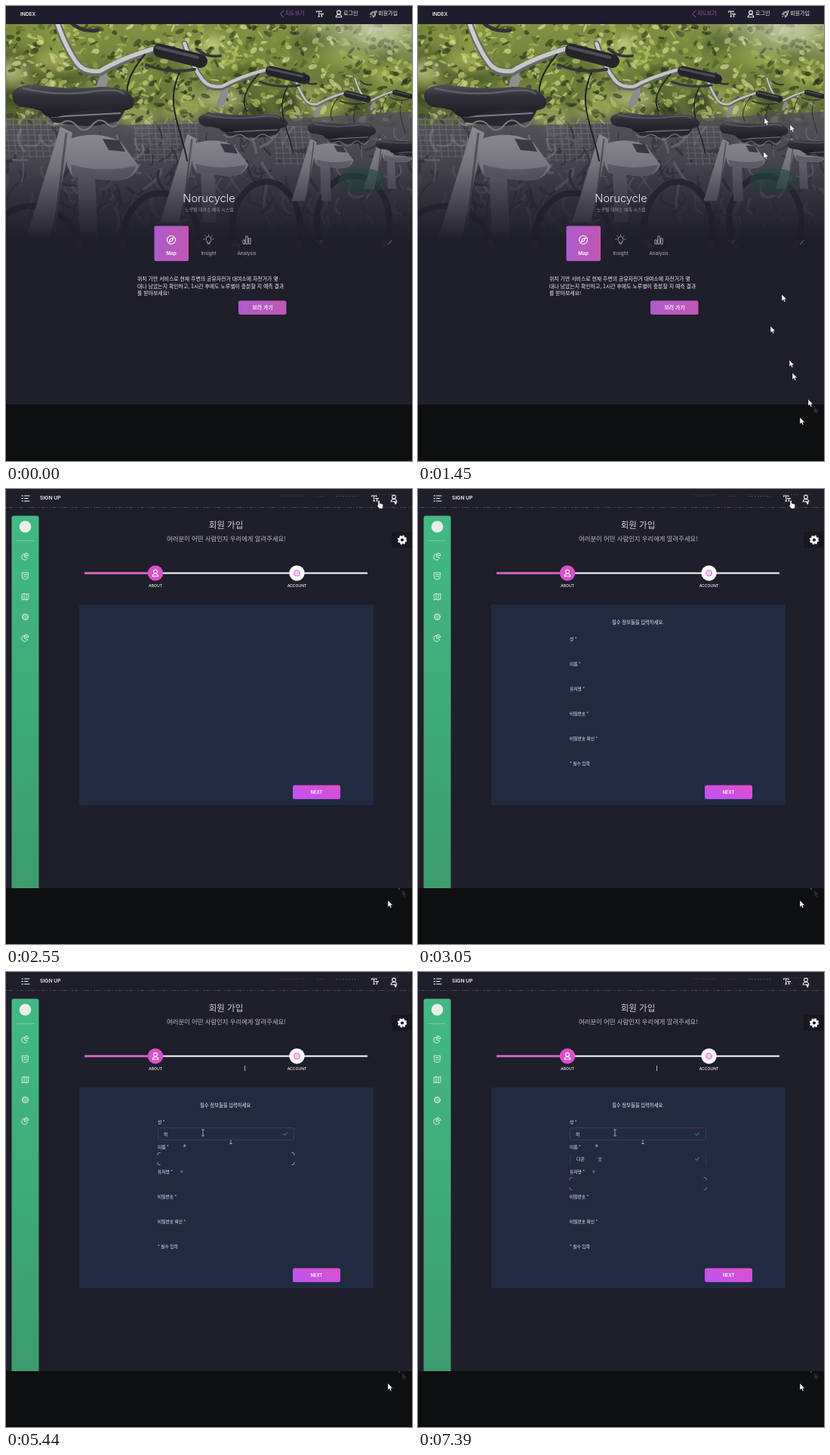
Write an HTML page that moves like this. It is 538 px wide and 603 px high and loops after 8000 ms.

```html
<!DOCTYPE html>
<html lang="ko">
<head>
<meta charset="utf-8">
<title>Bike share sign-up</title>
<style>
html, body { margin: 0; width: 100%; height: 100%; overflow: hidden; background: #0e0f11; }
svg { display: block; width: 538px; height: 603px; }
text { font-family: Inter, "Noto Sans CJK KR", "Noto Sans CJK", sans-serif; fill: #f1f0f5; }
.ko { font-family: "Noto Sans CJK KR", "Noto Sans CJK", sans-serif; }
.mid { text-anchor: middle; }
.b { font-weight: 700; }
.line { fill: none; stroke: #fff; stroke-linecap: round; stroke-linejoin: round; }
[data-t] { visibility: hidden; }
</style>
</head>
<body>
<svg viewBox="0 0 538 603">
<defs>
  <linearGradient id="photo" x2="0" y2="1">
    <stop stop-color="#839244"/><stop offset=".38" stop-color="#6d7b3c"/>
    <stop offset=".5" stop-color="#615f63"/><stop offset=".75" stop-color="#4a4853"/><stop offset="1" stop-color="#1f1e2b"/>
  </linearGradient>
  <linearGradient id="shade" x2="0" y2="1">
    <stop stop-color="#1f1e2b" stop-opacity="0"/><stop offset=".4" stop-color="#1f1e2b" stop-opacity=".1"/>
    <stop offset=".65" stop-color="#1f1e2b" stop-opacity=".34"/><stop offset=".85" stop-color="#1f1e2b" stop-opacity=".74"/>
    <stop offset="1" stop-color="#1f1e2b"/>
  </linearGradient>
  <radialGradient id="haze"><stop stop-color="#cbd2c2" stop-opacity=".75"/><stop offset="1" stop-color="#a5b08f" stop-opacity="0"/></radialGradient>
  <linearGradient id="leather" x2="0" y2="1"><stop stop-color="#57565d"/><stop offset=".35" stop-color="#33323a"/><stop offset="1" stop-color="#1d1c23"/></linearGradient>
  <linearGradient id="mauve"><stop stop-color="#ad5ccb"/><stop offset="1" stop-color="#c058b4"/></linearGradient>
  <linearGradient id="pink" y1="1" y2="0"><stop stop-color="#ba54f5"/><stop offset="1" stop-color="#e14eca"/></linearGradient>
  <linearGradient id="side" x2="0" y2="1"><stop stop-color="#42b983"/><stop offset="1" stop-color="#3d9c6c"/></linearGradient>
  <clipPath id="hero"><path d="M0 24H538V320H0z"/></clipPath>
  <filter id="soft"><feGaussianBlur stdDeviation="7"/></filter>
  <filter id="crisp"><feGaussianBlur stdDeviation=".6"/></filter>

  <g id="seat">
    <path d="M48 136L160 134 150 152Q120 162 92 158L62 154z" fill="#2b2a31"/>
    <path d="M54 153q10 9 20 2t20 4 20-1 20-2 18-6M60 147L152 142" fill="none" stroke="#8d8b92" stroke-width="2"/>
    <path d="M8 117Q12 104 38 104Q85 112 125 107Q164 107 170 126Q171 138 152 139Q105 134 76 145Q54 152 46 139Q36 135 20 134Q8 130 8 117z" fill="url(#leather)"/>
    <path d="M22 109Q70 120 110 114T156 117" fill="none" stroke="#77767c" stroke-width="2.500" opacity=".7"/>
  </g>
  <g id="body">
    <path d="M72 160L88 168 58 310H26z" fill="#a3a1a8"/>
    <path d="M80 168L64 300" fill="none" stroke="#66646d" stroke-width="3"/>
    <path d="M95 225L118 228 122 310H98z" fill="#817f88"/>
    <path d="M84 176Q122 164 152 180L176 212Q168 234 138 231L88 226Q74 205 84 176z" fill="#a5a3ab"/>
    <path d="M86 210Q125 222 172 212Q166 234 138 231L88 226z" fill="#7d7b85"/>
    <path d="M128 176L150 178 158 193 136 191z" fill="#44424d"/>
  </g>
  <g id="bar" fill="none" stroke-linecap="round">
    <path d="M130 96L122 116" stroke="#97979a" stroke-width="12"/>
    <path d="M64 10Q76 50 93 74Q103 91 125 88Q151 72 194 58" stroke="#6c6d6e" stroke-width="10"/>
    <path d="M64 10Q76 50 93 74Q103 89 125 86Q151 70 194 57" stroke="#d0d1cf" stroke-width="5.500"/>
    <path d="M84 20Q100 36 122 32" stroke="#34333a" stroke-width="5"/>
    <path d="M204 59L258 73" stroke="#26252b" stroke-width="18"/>
    <path d="M200 55L254 68" stroke="#504f55" stroke-width="4"/>
    <path d="M186 78Q215 90 250 84" stroke="#39383e" stroke-width="4"/>
    <path d="M230 88C210 130 232 160 240 205M184 64Q150 105 165 130" stroke="#242329" stroke-width="2"/>
  </g>
  <path id="arrow" d="M0 0V9L2.1 7.2 3.5 10.3 5 9.6 3.7 6.7H6.4z" fill="#fff" stroke="#1a1a22" stroke-width=".5"/>
  <path id="hand" d="M2 0Q3.2 0 3.2 1.2V4L7 5Q8 5.4 7.6 7L7 11H2.6L0 7.4Q-.3 6 1 6.5V1.2Q1 0 2 0z" fill="#fff" stroke="#1a1a22" stroke-width=".5"/>
  <path id="beam" d="M-2 -4H2M0 -4V4M-2 4H2" fill="none" stroke="#a9acb9" stroke-width=".9"/>
  <path id="corners" d="M0 3.5V2Q0 0 2 0H3.5M177.5 0H179Q181 0 181 2V3.5M181 12.5V14Q181 16 179 16H177.5M3.5 16H2Q0 16 0 14V12.5" fill="none" stroke-width=".9"/>
  <path id="tick" d="M0 2L1.8 4 5.2 0" fill="none" stroke-width=".9"/>
  <g id="user" fill="none" stroke-width="1.1"><circle cy="-2" r="2.4"/><path d="M-3.8 4.3Q-3.8 1 0 1T3.8 4.3z"/></g>
  <path id="type" d="M-4.5 -2V-3.5H2V-2M-1.3 -3.5V3.5M-2.8 3.5H.2M0 0H4.5V1M2.5 0V3.5M1.5 3.5H3.5" fill="none" stroke-width="1.1"/>
  <g id="rocket" fill="none" stroke-width=".85"><path d="M-2.8 .4Q0 -4 4.2 -4.2Q4 0 -.4 2.8z M-2.6 0L-4.6 .6 -2.4 -2.4 0 -2.4M0 2.6L-.6 4.6 2.4 2.4V0M-2.8 2.6L-4.4 4.4"/><circle cx="1.4" cy="-1.4" r=".8"/></g>
  <g id="pie" class="line" stroke-width=".9"><path d="M-1 -3A4 4 0 1 0 3 2L-1 1z"/><path d="M1 -4.4A4 4 0 0 1 4.4 -.6H1z"/></g>
  <g id="cog" fill="none"><circle r="3.9" stroke-width="1.2" stroke-dasharray="1.6 .85"/><circle r="3.2" stroke-width=".7"/><circle r="1.3" stroke-width=".7"/></g>
</defs>

<path fill="#0e0f11" d="M0 0H538V603H0z"/>

<g data-t="0 2550">
  <path fill="#1f1e2b" d="M0 0H538V528H0z"/>
  <g clip-path="url(#hero)">
    <path fill="url(#photo)" d="M0 24H538V310H0z"/>
    <g id="clumps" filter="url(#soft)"></g>
    <g id="leaves" filter="url(#crisp)"></g>
    <ellipse cx="490" cy="30" rx="120" ry="50" fill="url(#haze)"/>
    <path fill="#5a5861" opacity=".75" d="M0 160L250 156 538 140V310H0z"/>
    <g id="wires" fill="none" stroke="#a3a1a9" opacity=".5"></g>
    <g id="clutter" fill="none" stroke-linecap="round" opacity=".55"></g>
    <g fill="none" stroke="#25242c" stroke-width="8" opacity=".8">
      <ellipse cx="205" cy="310" rx="50" ry="62"/><ellipse cx="345" cy="295" rx="45" ry="62"/>
      <ellipse cx="460" cy="285" rx="48" ry="60"/><ellipse cx="35" cy="335" rx="65" ry="70"/>
    </g>
    <g filter="url(#crisp)">
      <use href="#bar" transform="translate(438 92) scale(.38)"/>
      <use href="#bar" transform="translate(350 87) scale(.5)"/>
      <use href="#body" transform="translate(462 103) scale(.45)"/>
      <use href="#seat" transform="translate(486 133) scale(.47 .42)"/>
      <use href="#body" transform="translate(364 88) scale(.55)"/>
      <use href="#seat" transform="translate(395 97) scale(.56 .54)"/>
      <ellipse cx="472" cy="232" rx="32" ry="17" fill="#23664c" opacity=".6"/>
      <use href="#bar" transform="translate(184 42) scale(.82 .75)"/>
      <use href="#body" transform="translate(184 45) scale(.78)"/>
      <use href="#seat" transform="translate(249 79) scale(.73 .6)"/>
      <use href="#bar"/><use href="#body"/><use href="#seat"/>
    </g>
    <path fill="url(#shade)" d="M0 24H538V310H0z"/>
  </g>
  <path fill="#1f1d2c" d="M0 0H538V24H0z"/>
  <text x="19" y="12.600" font-size="6.600" font-weight="600">INDEX</text>
  <path d="M368 6L363.500 10.500 368 15" class="line" style="stroke:#a352b5"/>
  <text class="ko" x="370" y="12.300" font-size="6.900" style="fill:#a352b5">지도보기</text>
  <g stroke="#eee">
    <use href="#type" x="416" y="10.500"/><use href="#user" x="441" y="10.500"/>
  </g>
  <text class="ko" x="447" y="12.300" font-size="7.100" font-weight="500">로그인</text>
  <g data-t="0 2070"><use href="#rocket" x="487" y="10.500" stroke="#eee"/>
    <text class="ko" x="493" y="12.300" font-size="7.100" font-weight="500">회원가입</text></g>
  <g data-t="2070 2550"><use href="#rocket" x="487" y="10.500" stroke="#e14eca"/>
    <text class="ko" x="493" y="12.300" font-size="7.100" font-weight="500" style="fill:#d94fc5">회원가입</text></g>

  <text class="mid" x="269" y="260" font-size="14.600" font-weight="300">Norucycle</text>
  <text class="ko mid" x="269.500" y="272" font-size="5.900" style="fill:#9793a0">노루별 대여소 예측 시스템</text>
  <rect x="196.500" y="291.500" width="45.500" height="46.500" rx="2" fill="url(#mauve)"/>
  <g class="line" stroke-width="1.1"><circle cx="219" cy="310" r="5.500"/><path d="M221.800 307.200L220.200 311.200 216.200 312.800 217.800 308.800z"/></g>
  <g class="line" style="stroke:#aaa7b3" stroke-width=".9">
    <path d="M266.500 313.500V312Q265 311 265 309A3.400 3.400 0 0 1 272 309Q272 311 270.500 312V313.500zM267 315H270M268.500 303V304M263 309H262M275 309H274M264.500 305L263.800 304.300M272.500 305L273.200 304.300"/>
    <path d="M314 315V310H316.500V315zM317.800 315V305H320.300V315zM321.600 315V308H324.200V315z"/>
  </g>
  <g class="mid" font-size="6.400">
    <text class="b" x="219" y="330">Map</text>
    <text x="268.500" y="330" style="fill:#b3b0bc">Insight</text>
    <text x="319" y="330" style="fill:#b3b0bc">Analysis</text>
  </g>
  <g font-size="6.900" font-weight="500">
    <text class="ko" x="174" y="364.300">위치 기반 서비스로 현재 주변의 공유자전거 대여소에 자전거가 몇</text>
    <text class="ko" x="174" y="373.900">대나 남았는지 확인하고, 1시간 후에도 노루별이 충분할 지 예측 결과</text>
    <text class="ko" x="174" y="383.400">를 받아보세요!</text>
  </g>
  <rect x="308" y="390.500" width="63.500" height="18.500" rx="2.500" fill="url(#mauve)"/>
  <text class="ko mid b" x="340" y="402.300" font-size="6.800">보러 가기</text>
</g>

<g data-t="2550 8000">
  <path fill="#1f1e2b" d="M0 0H538V529H0z"/>
  <path d="M0 24.500H538" stroke="#55612f" stroke-width=".8" stroke-dasharray="2 1.500 5 2 1 3"/>
  <path d="M21 9H22.500M24.500 9H31M21 12.500H22.500M24.500 12.500H29M21 16H22.500M24.500 16H31" class="line" stroke-width="1.100"/>
  <text x="45" y="14.300" font-size="6.800" font-weight="600">SIGN UP</text>
  <g fill="none" stroke="#6d4177" stroke-width=".8" stroke-dasharray="1.500 2.500">
    <path d="M365 9H397M412 9.500H421M482 7.500H519"/><path d="M438 9.500H467" stroke="#777381"/>
  </g>
  <g stroke="#eee"><use href="#type" x="489" y="12.500"/><use href="#user" x="514" y="12.500"/></g>
  <path fill="#fff" d="M514 16L518 18 516 21z"/>

  <path fill="url(#side)" d="M7.500 38Q7.500 35.500 10 35.500H41Q43.500 35.500 43.500 38V529H7.500z"/>
  <circle cx="25.500" cy="50" r="7.800" fill="#e8eee9"/>
  <path d="M14 68.500H37" stroke="#82cfaa" stroke-width=".8"/>
  <g opacity=".85">
    <use href="#pie" x="25.500" y="89"/><use href="#pie" x="25.500" y="197"/>
    <path d="M21.500 111H29.500L29 118.500 25.500 120 22 118.500zM23.500 113.500H27.500M23.500 116H27.500" class="line" stroke-width=".9"/>
    <path d="M21.500 139.500L24 138.500 27 139.500 29.800 138.500V146L27 147 24 146 21.500 147zM24 138.500V146M27 139.500V147" class="line" stroke-width=".9"/>
    <use href="#cog" x="25.500" y="169.500" stroke="#fff"/>
  </g>
  <path fill="#17171f" d="M538 57H514Q511 57 511 60V75Q511 78 514 78H538z"/>
  <g transform="translate(525 67.500)" fill="none" stroke="#fff"><circle r="3.600" stroke-width="3"/><circle r="5.300" stroke-width="1.800" stroke-dasharray="2.300 1.860"/></g>

  <text class="ko mid" x="291.500" y="51.500" font-size="11.500" style="fill:#d2d0d9">회원 가입</text>
  <text class="ko mid" x="292" y="69.300" font-size="8.350" style="fill:#bbb9c5">여러분이 어떤 사람인지 우리에게 알려주세요!</text>
  <path d="M104 111.500H479" stroke="#fff" stroke-width="2"/>
  <path d="M104 111.500H198" stroke="#e14eca" stroke-width="2"/>
  <circle cx="198" cy="111.500" r="10.200" fill="#dc4fca"/>
  <circle cx="385.500" cy="111.500" r="10.200" fill="#fff"/>
  <use href="#user" x="198" y="111.500" stroke="#fff"/>
  <use href="#cog" x="385.500" y="111.500" stroke="#df62cf"/>
  <g class="mid" font-size="5.100" font-weight="500">
    <text x="198" y="130">ABOUT</text><text x="385.500" y="130">ACCOUNT</text>
  </g>
  <rect x="97" y="153" width="390" height="266" rx="1.500" fill="#222a42"/>
  <rect x="380" y="392.500" width="63" height="18.500" rx="2.500" fill="url(#pink)"/>
  <text class="mid b" x="411.500" y="403.900" font-size="5.700">NEXT</text>
  <path d="M520 530H522" stroke="#777"/>

  <g data-t="2620 8000 400">
    <text class="ko mid" x="291.500" y="179" font-size="6.300">필수 정보들을 입력하세요.</text>
    <g id="labels" font-size="5.700"></g>
  </g>

  <rect data-t="3540 5080 210" x="201.500" y="206.500" width="180" height="16" rx="2" fill="none" stroke="#a33fae" stroke-width=".9"/>
  <rect data-t="5080 8000" x="201.500" y="206.500" width="180" height="16" rx="2" fill="none" stroke="#50325f" stroke-width=".9"/>
  <text class="ko" data-t="4610 8000" x="209" y="216.800" font-size="5.800">하</text>
  <use data-t="4820 7180" href="#tick" x="367.500" y="212.500" stroke="#5b8f94"/>
  <use data-t="7180 8000" href="#tick" x="367.500" y="212.500" stroke="#2fae96"/>
  <text class="ko" data-t="4410 8000" x="234" y="231.500" font-size="5.800">ㅎ</text>

  <use data-t="5080 7180 200" href="#corners" x="201" y="239.500" stroke="#a9a5b8"/>
  <path data-t="7180 8000" d="M201.500 241V254M381.500 241V254" stroke="#41384f" stroke-width=".8"/>
  <text class="ko" data-t="5370 8000" x="231" y="266" font-size="4.800">ㄷ</text>
  <text class="ko" data-t="5850 8000" x="210" y="249.500" font-size="5.800">다</text>
  <text class="ko" data-t="6250 8000" x="215.400" y="249.500" font-size="5.800">온</text>
  <text class="ko" data-t="6450 8000" x="238.500" y="249.500" font-size="5.600">오</text>
  <use data-t="7250 8000" href="#tick" x="367.500" y="245.500" stroke="#00c9a0"/>
  <use data-t="7180 8000 200" href="#corners" x="201" y="272.500" stroke="#d548c4"/>
</g>
<g id="pointers"></g>
</svg>

<script>
const LOOP = 8000;
const $ = id => document.getElementById(id);

function add(parent, tag, attrs, text) {
  const el = document.createElementNS('http://www.w3.org/2000/svg', tag);
  for (const k in attrs) el.setAttribute(k, attrs[k]);
  if (text) el.textContent = text;
  return parent.appendChild(el);
}

let seed = 11;
const rnd = () => (seed = seed * 16807 % 2147483647) / 2147483647;
const pick = list => list[rnd() * list.length | 0];

// foliage behind the bikes
const greens = ['#27331a', '#37461f', '#55692c', '#82983f', '#a6b952', '#c6d36c', '#dfe59a'];
for (let i = 0; i < 60; i++) {
  add($('clumps'), 'ellipse', {
    cx: rnd() * 538, cy: 24 + rnd() * 125, rx: 12 + rnd() * 18, ry: 7 + rnd() * 10,
    fill: pick(greens), opacity: .6
  });
}
for (let i = 0; i < 1100; i++) {
  const x = rnd() * 538, y = 20 + rnd() * 138;
  add($('leaves'), 'ellipse', {
    rx: 2 + rnd() * 5, ry: 1 + rnd() * 2.6, fill: pick(greens), opacity: .65,
    transform: `translate(${x} ${y}) rotate(${rnd() * 140 - 70})`
  });
}

// baskets
for (const [x, y, w] of [[0, 150, 75], [170, 155, 85], [355, 160, 50]]) {
  let d = '';
  for (let i = 0; i < 8; i++) d += `M${x} ${y + i * 7}h${w}`;
  for (let i = 0; i <= w; i += 9) d += `M${x + i} ${y}l5 52`;
  add($('wires'), 'path', { d });
}

// spokes and frame tubes
for (let i = 0; i < 220; i++) {
  const x = rnd() * 538, y = 160 + rnd() * 130;
  add($('clutter'), 'path', {
    d: `M${x} ${y}q${rnd() * 20 - 10} ${rnd() * 20} ${rnd() * 44 - 22} ${rnd() * 34}`,
    stroke: pick(['#2a2931', '#34323b', '#77757e', '#96949c']), 'stroke-width': 1 + rnd() * 3
  });
}

['성 *', '이름 *', '유저명 *', '비밀번호 *', '비밀번호 확인 *', '* 필수 입력'].forEach((s, i) =>
  add($('labels'), 'text', { class: 'ko', x: 201, y: 201.2 + i * 32.9 }, s));

function pointer(kind, x, y, from, to, opacity = 1) {
  const g = add($('pointers'), 'g', { 'data-t': `${from} ${to}` });
  add(g, 'use', { href: '#' + kind, x, y, opacity });
}

function stroke(d, color, from, to) {
  const g = add($('pointers'), 'g', { 'data-t': `${from} ${to}` });
  add(g, 'path', { d, stroke: color, 'stroke-width': .9 });
}

// pointer copies that stay behind on the first page
[[517, 521, 470], [496, 486, 610], [492, 469, 680], [467, 424, 750], [482, 382, 820],
 [458, 193, 1180], [493, 157, 1250], [459, 148, 1450], [484, 114, 1590], [476, 91, 1660],
 [505, 72, 1800], [506, 48, 1870], [517, 28, 2010]
].forEach(([x, y, from]) => pointer('arrow', x, y, from, 2550));
pointer('arrow', 506, 545, 540, LOOP);
pointer('arrow', 525, 531, 400, 470);
pointer('arrow', 525, 531, 470, LOOP, .12);

// quick passing positions
[[478, 338, 890], [472, 296, 960], [466, 256, 1030], [461, 222, 1110], [515, 13, 2070], [505, 16, 2140],
 [440, 50, 3120], [380, 90, 3190]
].forEach(([x, y, from]) => pointer('arrow', x, y, from, from + 70));
pointer('hand', 492, 15, 2210, 3120);
stroke('M515 15v5l4 0', '#fff', 2070, 2550);
stroke('M316.500 124v7', '#c5c5cf', 3260, LOOP);
stroke('M298 222.500v5M296 227.500h4', '#a9acb9', 3330, LOOP);
pointer('beam', 261, 213, 3400, LOOP);

const timed = [...document.querySelectorAll('[data-t]')].map(el => {
  const [from, to, fade = 0] = el.dataset.t.split(' ').map(Number);
  return { el, from, to, fade };
});

function draw() {
  const t = performance.now() % LOOP;
  for (const { el, from, to, fade } of timed) {
    const on = t >= from && t < to;
    el.style.visibility = on ? 'visible' : 'hidden';
    if (fade) el.style.opacity = Math.min(1, Math.max(0, (t - from) / fade));
  }
  requestAnimationFrame(draw);
}
draw();
</script>
</body>
</html>
```
